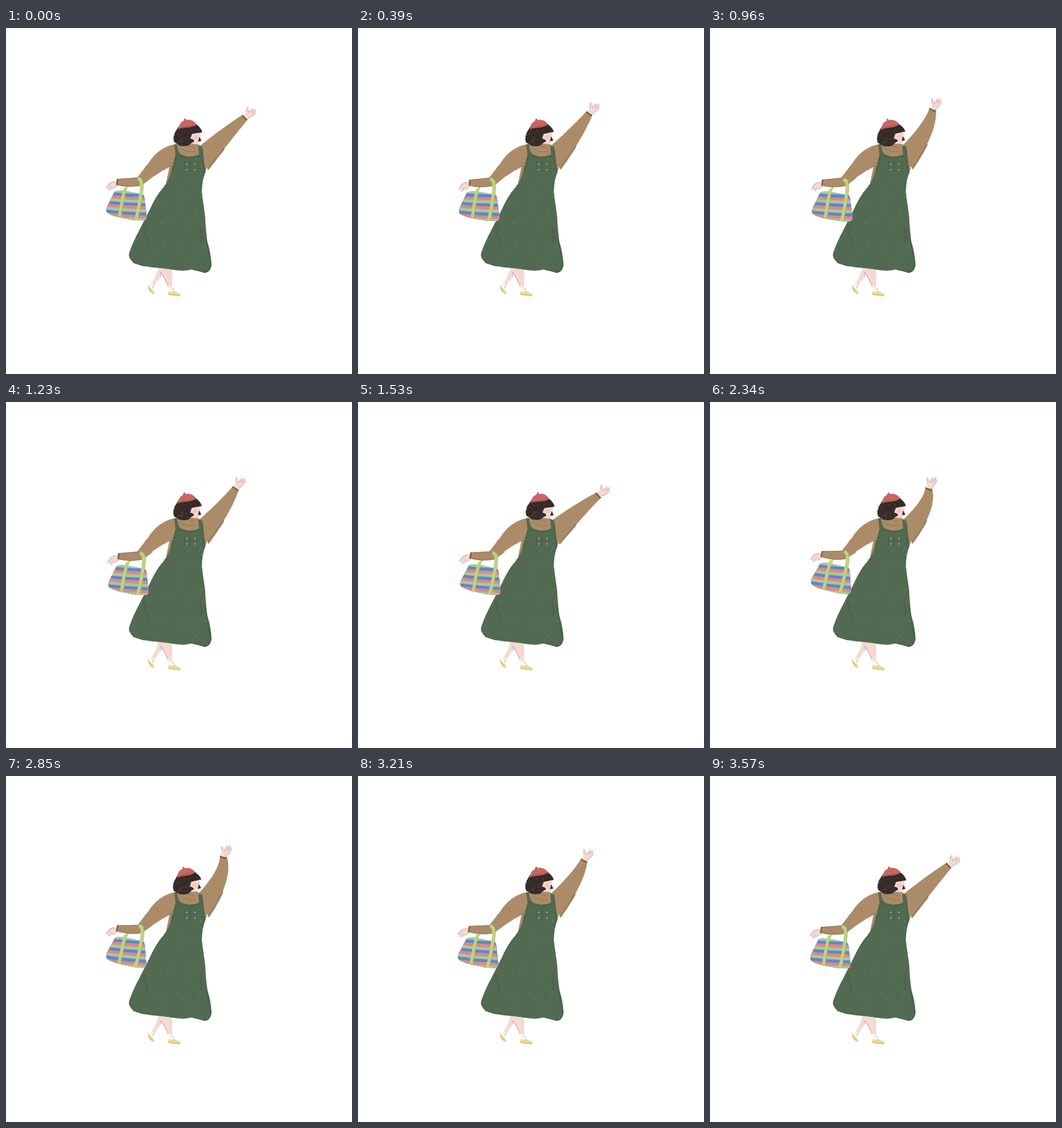
These frames come from a looping animation (500x500 px, 3.6 s). An HTML page:

```html
<!DOCTYPE html>
<html lang="en">
<head>
<meta charset="utf-8">
<title>Waving woman</title>
<style>
  html, body { margin: 0; width: 100%; height: 100%; overflow: hidden; background: #fff; }
  svg { display: block; width: 100vw; height: 100vh; }
  .skin { fill: #f5d9d3; }
  .wool { fill: #ac8c68; }
  .rib { stroke: #7d6149; stroke-width: 2.4; fill: none; }
  .seam { stroke: #866a50; stroke-width: .7; fill: none; }
  .fold { stroke: #40573f; fill: none; stroke-linecap: round; opacity: .6; }
  .line { stroke: #a98d86; stroke-width: .6; fill: none; stroke-linecap: round; }
  .strap { stroke: #c0d186; fill: none; stroke-linejoin: round; }
  .edge { stroke: #9aae62; stroke-width: .6; fill: none; }
</style>
</head>
<body>
<svg viewBox="0 0 500 500">
  <defs>
    <filter id="rough" filterUnits="userSpaceOnUse" x="130" y="80" width="260" height="320" color-interpolation-filters="sRGB">
      <feTurbulence type="fractalNoise" baseFrequency=".35" numOctaves="2" seed="4"/>
      <feDisplacementMap in="SourceGraphic" scale="1.7" xChannelSelector="R" yChannelSelector="G"/>
    </filter>
    <clipPath id="dressClip"><use href="#dress"/></clipPath>
    <clipPath id="hairClip"><use href="#hair"/></clipPath>
    <clipPath id="bagClip"><path d="M157 236Q163 233.500 172 235L196 239.500Q200 240 200.500 246L203.500 272Q204 277 199 278L186 277.500L166 274Q148 270 145.500 265.500Q144.500 262 148 255Z"/></clipPath>
  </defs>
  <g filter="url(#rough)">
    <path id="sleeve" class="wool"/>
    <path id="shade" class="rib" stroke-linecap="round" opacity=".65"/>
    <g id="hand">
      <path class="skin" d="M-3.500 -1L-4.500 -7L-8 -13Q-7.500 -15 -5.500 -13.500L-2.500 -10.500L-2 -16Q-1 -18 .5 -16.500L2 -19.500Q3.500 -20.500 4 -18L6 -17Q7.500 -17 7 -14.500L6 -7L3.500 -1Z"/>
      <path class="line" d="M-4.500 -7L-8 -13M-2.500 -10.500L-1 -8.500M.500 -16L.500 -11M4 -17L3 -11M7 -15L6 -7L4 -2"/>
      <path class="rib" d="M-5 1H5"/>
    </g>

    <path class="skin" d="M221 344L235 344Q226 356 215 371L209.500 369Q217 361 221 344Z"/>
    <path fill="#e5c3bc" d="M222 345H230L223 360Z"/>
    <path class="skin" d="M222 344L240 344Q241 359 239.500 375L234.500 375Q228 361 222 350Z"/>
    <path class="line" d="M224 353Q230 362 234 372"/>
    <path fill="#f7f4ef" d="M209.500 368L215 371L212 377L207 373ZM234 372L240 373L244 379L236 380Z"/>
    <path class="line" d="M239 373L243 379M214 371L212 376"/>
    <path fill="#ecd98d" d="M205 370Q206.500 375 212 378.500L215 383Q211.500 385.500 208 381Q204 376 205 370ZM235 380Q239 382.500 243 379.500Q246 382 252 384Q254.500 387 249 387.300L236 386Q233.500 384 235 380Z"/>
    <path class="line" d="M206 375Q208 380 213 384M235 385L251 387.200"/>

    <path class="wool" d="M244 168Q232 170 222 177.500Q213 184 206 195L189 217L195 225.500Q209 218 222 209L236 201L231 226L246 214L290 205L287 174L278 168H250Z"/>
    <path class="seam" d="M239.500 199Q239 210 233.500 224M236 201L241 195M206 199L193 215"/>

    <path id="dress" fill="#526a51" d="M243 168L247 167.500Q248 177 252 182Q264 189 279 183L277.500 170L283.500 171Q285 188 288.500 207Q283 220 282.500 238Q285 256 287.500 272Q288 294 291 309Q296.500 326 297 343Q295.500 353 287 354Q277 350 268 349Q258 352 246 350Q228 347 212 346Q194 344 184 339Q176 332 178 325Q182 313 188 301L207 264Q214 248 222 237Q233 225 237 213Q241 199 245 183Z"/>
    <path class="fold" stroke-width="1.400" d="M199 287Q200 303 207 314M280 288Q284 301 282 309M288 207Q282 220 282.500 238L287 272L290 309L296 342Q294 353 287 353L270 349M184 339L200 344"/>
    <path class="fold" stroke-width="1.300" d="M250 184Q264 191 279 185M266 192V208M258 194V206M284 176L286 205M246 184L240 208"/>
    <g id="buttons" fill="#c9bd95"></g>
    <g id="specks" clip-path="url(#dressClip)"></g>

    <path class="wool" d="M255 166H276L278 171Q279 178 276 181Q262 184 252 177Z"/>
    <path class="seam" d="M252 173Q262 182 274 178M262 170L272 173"/>

    <g id="head">
      <path class="skin" d="M265 148L281 149L281 158Q281 165 276 168L266 167Z"/>
      <ellipse cx="274" cy="158" rx="4" ry="3" fill="#f0c0bd" opacity=".75"/>
      <path id="hair" fill="#352b28" d="M249 143Q256 136 271 137Q281 142 283.500 150.500L269 153L266 160Q271 160 272 164Q266 167 265 169Q259 172 251 170L243 165Q240.500 159 244 151ZM279.500 157L282.500 163L277.500 164Z"/>
      <g id="hairSpecks" clip-path="url(#hairClip)"></g>
      <path fill="#c76663" d="M249 146Q249.500 137 256.500 134L257.500 131L259.500 131L260 133Q269 131 275 139Q274 142 265 143.500Q255 144 249 146Z"/>
      <path fill="none" stroke="#a64f4f" stroke-width=".7" d="M251 144.500Q261 140.500 273 141M258 133.500L258.500 131"/>
    </g>

    <path id="backStrap" class="strap" stroke-width="3" d="M171 237L175 229Q184 220 193 221"/>
    <g id="forearm">
      <path class="skin" d="M162 220L154 221.500Q148 224 144 230Q144 233 147 232L149 235L154 232.500L161 228Z"/>
      <path class="line" d="M145 231L150 226M149 234.500L153 229.500M156 222L148 225M161 228L155 232"/>
      <path class="wool" d="M162 218Q176 217.500 190 216L205 197L210 217Q203 223 194 228Q176 231 160 227Z"/>
      <path class="rib" d="M161.500 218L160 227"/>
      <path class="seam" d="M162 227Q178 230.500 194 227.500L200 224.500M164 218.500L189 216.500"/>
    </g>
    <g id="bag">
      <g id="stripes" clip-path="url(#bagClip)"></g>
      <path class="strap" stroke-width="4.500" d="M164.500 273Q167 253 171 236L173 231"/>
      <path class="edge" d="M167 273Q170 253 173 237"/>
      <path class="strap" stroke-width="4.800" d="M188 277.500Q193 258 194.500 243Q197 229 195.500 222Q195 218.500 190.500 217.500"/>
      <path class="edge" d="M191 277Q195 258 197 243Q199.500 229 198 222"/>
    </g>
  </g>
</svg>
<script>
const LOOP = 3600, STEP = 30;
const $ = id => document.getElementById(id);
const set = (id, name, value) => $(id).setAttribute(name, value);

// Wrist path: time, x, y
const wrist = [
  [0, 345.5, 129], [900, 321, 117], [1840, 356, 141],
  [2340, 316, 125], [2700, 311, 116.5], [3240, 328, 122]
];

// Periodic cubic through unevenly spaced keys
function follow(keys, t) {
  const n = keys.length;
  const key = i => {
    const [time, x, y] = keys[(i + n) % n];
    return [time + Math.floor(i / n) * LOOP, x, y];
  };
  let i = n - 1;
  while (keys[i][0] > t) i--;
  const [a, b, c, d] = [-1, 0, 1, 2].map(o => key(i + o));
  const span = c[0] - b[0], u = (t - b[0]) / span;
  return [1, 2].map(j => {
    const m0 = (c[j] - a[j]) / (c[0] - a[0]) * span;
    const m1 = (d[j] - b[j]) / (d[0] - b[0]) * span;
    const e = c[j] - b[j];
    return b[j] + u * (m0 + u * (3 * e - 2 * m0 - m1 + u * (m0 + m1 - 2 * e)));
  });
}

// The elbow and the hand follow from where the wrist is
function drawArm(wx, wy) {
  const sx = 280, sy = 192, n = 14;
  const mx = 307 + (wx - 312) * .25, my = 86 + wy * .55;
  const cx = 2 * mx - (sx + wx) / 2, cy = 2 * my - (sy + wy) / 2;
  const left = [], right = [];
  for (let i = 0; i <= n; i++) {
    const u = i / n, v = 1 - u;
    const x = v * v * sx + 2 * u * v * cx + u * u * wx;
    const y = v * v * sy + 2 * u * v * cy + u * u * wy;
    const dx = v * (cx - sx) + u * (wx - cx), dy = v * (cy - sy) + u * (wy - cy);
    const k = (17 - 12 * u) / Math.hypot(dx, dy);
    left.push([x + dy * k, y - dx * k]);
    right.push([x - dy * k, y + dx * k]);
  }
  const path = pts => 'M' + pts.map(p => p.map(v => v.toFixed(2)).join(' ')).join('L');
  set('shade', 'd', path(right.slice(0, 6)));
  set('sleeve', 'd', path([...left, ...right.reverse()]) + 'Z');
  set('hand', 'transform', `translate(${wx} ${wy}) rotate(${19 + (wx - 312) * .75})`);
}

function draw(t) {
  const phase = 2 * Math.PI * t / LOOP;
  const c = Math.cos(phase), s = Math.sin(phase);
  const tilt = 2.5 * Math.cos(2 * phase) - 1.3 * c - .7;
  const shift = 2 - 2 * c;
  const turn = 1.1 - 1.1 * c - 2.5 * s;
  const hang = `translate(${shift} ${.2 + 1.2 * s}) rotate(${1.4 - c - 1.5 * s} 194 217)`;
  drawArm(...follow(wrist, t));
  set('head', 'transform', `rotate(${tilt} 264 172)`);
  set('forearm', 'transform', `translate(${shift * .6} 0) rotate(${turn} 204 206)`);
  set('bag', 'transform', hang);
  set('backStrap', 'transform', hang);
}

let seed = 17;
const rand = () => (seed = seed * 16807 % 2147483647) / 2147483647;

function add(parent, tag, attrs) {
  const el = document.createElementNS('http://www.w3.org/2000/svg', tag);
  for (const k in attrs) el.setAttribute(k, attrs[k]);
  $(parent).append(el);
}

function speckle(parent, count, x, y, w, h, fill) {
  for (let i = 0; i < count; i++)
    add(parent, 'circle', { cx: x + rand() * w, cy: y + rand() * h, r: .3 + rand() * .3, fill });
}

speckle('specks', 150, 178, 180, 120, 175, '#86997f');
speckle('specks', 70, 178, 180, 120, 175, '#435942');
speckle('hairSpecks', 28, 241, 145, 30, 26, '#8c7d74');
for (const x of [261, 273])
  for (const y of [197, 205]) add('buttons', 'circle', { cx: x, cy: y, r: 1 });

const colors = ['#a3cb99', '#6085d0', '#e0897d'];
for (let i = 0; i < 11; i++) {
  const y = 232 + i * 4.3, r = 235 + i * 4.5;
  add('stripes', 'path', { d: `M140 ${y}Q175 ${y + 4} 210 ${r}V290H140Z`, fill: colors[i % 3] });
}

const start = performance.now();
function tick() {
  const t = (performance.now() - start) % LOOP;
  draw(Math.floor(t / STEP) * STEP);
  requestAnimationFrame(tick);
}
draw(0);
requestAnimationFrame(tick);
</script>
</body>
</html>
```
